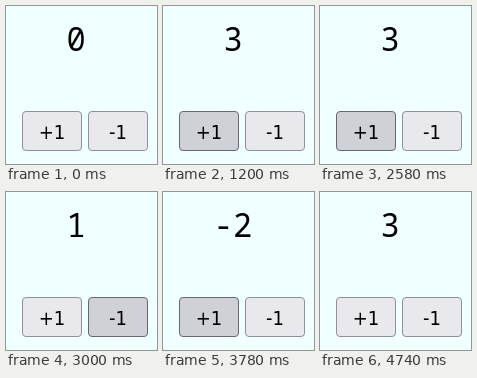
Recreate the animation shown at these times as an HTML page. Size 151 by 158 pixels, loop 5100 ms.

```html
<!DOCTYPE html>
<html lang="en">
<head>
<meta charset="utf-8">
<title>Counter</title>
<style>
  html, body { margin: 0; width: 100%; height: 100%; overflow: hidden; background: #f0ffff; }
  svg { display: block; width: 151px; height: 158px; }
  text { text-anchor: middle; fill: #000; }
  #count { font: 500 32px "Noto Sans Mono", "DejaVu Sans Mono", monospace; }
  .button rect { fill: #e9e9ed; stroke: #8f8f9d; }
  .button text { font: condensed 20px "DejaVu Sans Condensed", "DejaVu Sans", sans-serif; }
  .button.hover rect { fill: #d0d0d7; stroke: #676774; }
  .button.press rect { fill: #b1b1b9; stroke: #484851; }
</style>
</head>
<body>
<svg viewBox="0 0 151 158">
  <text id="count" x="70" y="45">0</text>
  <g class="button" id="plus">
    <rect x="16.5" y="105.5" width="59" height="39" rx="3.5"/>
    <text x="46" y="132.5">+1</text>
  </g>
  <g class="button" id="minus">
    <rect x="82.5" y="105.5" width="59" height="39" rx="3.5"/>
    <text x="112" y="132.5">-1</text>
  </g>
</svg>
<script>
  const LOOP = 5100;
  const count = document.getElementById("count");
  const buttons = ["plus", "minus"].map(id => document.getElementById(id));

  // Pointer moves: [time, button id]
  const moves = [
    [0, ""], [180, "minus"], [240, "plus"], [1320, "minus"], [2040, "plus"],
    [2700, "minus"], [3660, "plus"], [4740, ""]
  ];

  // Clicks: [press time, release time]; equal times are taps too short to see
  const clicks = [
    ...[600, 960, 1140, 1500, 1680, 1860, 2160, 2340, 2520,
        2760, 2940, 3060].map(t => [t, t + 60]),
    [3240, 3240], [3360, 3420], [3540, 3600],
    [3780, 3780],
    ...[3900, 4080, 4260, 4440, 4620].map(t => [t, t + 60])
  ];

  const pointerAt = t => moves.filter(([at]) => at <= t).pop()[1];

  function valueAt(t) {
    return clicks
      .filter(([, up]) => up <= t)
      .reduce((sum, [, up]) => sum + (pointerAt(up) === "plus" ? 1 : -1), 0);
  }

  function draw(t) {
    const target = pointerAt(t);
    const down = clicks.some(([from, to]) => t >= from && t < to);
    count.textContent = valueAt(t);
    for (const b of buttons) {
      const state = b.id !== target ? "" : down ? " press" : " hover";
      b.setAttribute("class", "button" + state);
    }
  }

  const start = performance.now();
  function tick() {
    draw((performance.now() - start) % LOOP);
    requestAnimationFrame(tick);
  }
  tick();
</script>
</body>
</html>
```
